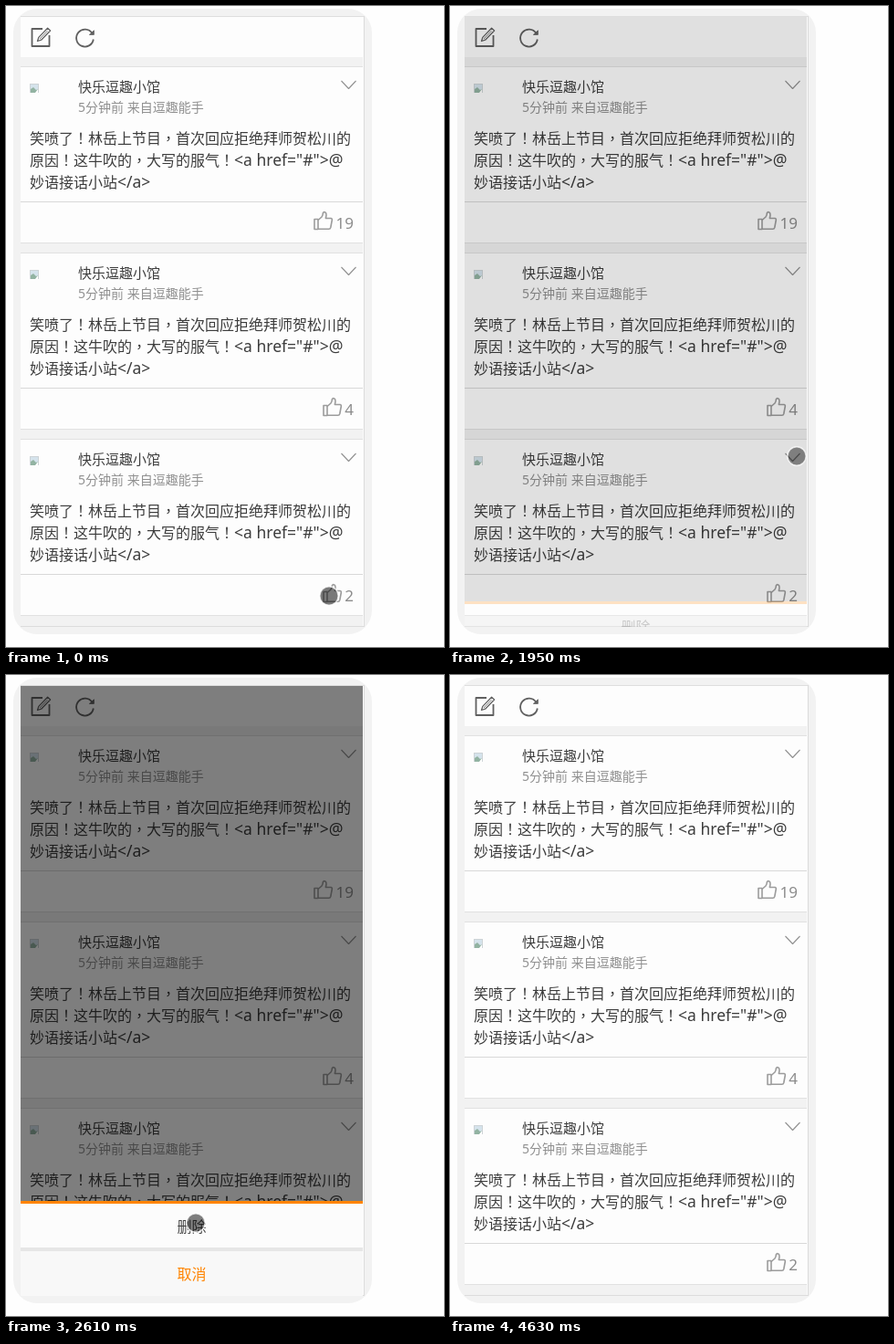
Recreate the animation shown at these times as an HTML page. Size 480 by 702 pixels, loop 5.42 s.

```html
<!DOCTYPE html>
<html lang="zh-CN">
<head>
<meta charset="utf-8">
<title>动态列表</title>
<style>
  html, body { margin: 0; width: 100%; height: 100%; overflow: hidden; background: #fefefe; }
  svg { display: block; width: 480px; height: 702px; }
  text { font: 16px "Noto Sans", "Noto Sans CJK SC", "Noto Sans CJK", sans-serif; fill: #3c3c3c; }
  .name { font-size: 15px; }
  .meta { font-size: 14px; fill: #909090; }
  .mid { font-family: "Noto Sans CJK TC", "Noto Sans CJK", sans-serif; }
  .code { font-size: 17.5px; }
  .count { font-size: 17px; fill: #8c8c8c; text-anchor: end; }
  .option { text-anchor: middle; fill: #444; }
  .cancel { fill: #ff8400; }
  .tool, .like, .arrow { fill: none; stroke-linejoin: round; }
  .tool { stroke: #606060; stroke-width: 1.8; }
  .like { stroke: #9c9c9c; stroke-width: 1.6; }
  .arrow { stroke: #909090; stroke-width: 1.1; }

  .layer, .sheet, .cursor { animation: 5420ms step-end infinite; }
  .layer { opacity: 0; animation-name: fade; }
  .sheet { animation-name: slide; }
  .cursor { animation-name: move; stroke: rgba(255, 255, 255, .75); stroke-width: 1.5; }

  @keyframes fade {
    0% { opacity: 0; }
    35.97% { opacity: .23; }
    38.92% { opacity: .81; }
    41.51% { opacity: 1; }
    67.89%, 100% { opacity: 0; }
  }
  @keyframes slide {
    0% { transform: translateY(104px); }
    35.97% { transform: translateY(76px); }
    38.92% { transform: translateY(18px); }
    41.51% { transform: none; }
    67.89%, 100% { transform: translateY(104px); }
  }
  @keyframes move {
    0% { transform: translate(354px, 646px); fill: rgba(0, 0, 0, .52); opacity: 1; }
    2.21% { transform: translate(383px, 694px); fill: rgba(0, 0, 0, .43); opacity: 0; }
    7.19% { transform: translate(383px, 694px); fill: rgba(0, 0, 0, .43); opacity: 1; }
    9.4% { transform: translate(360px, 677px); }
    11.62% { transform: translate(341px, 657px); }
    14.39% { transform: translate(347px, 653px); }
    16.6% { transform: translate(360px, 650px); }
    18.81% { transform: translate(373px, 649px); }
    21.4% { transform: translate(388px, 622px); }
    23.61% { transform: translate(393px, 578px); }
    26.01% { transform: translate(390px, 535px); }
    28.22% { transform: translate(383px, 503px); }
    30.99% { transform: translate(380px, 493px); }
    41.51% { transform: translate(368px, 508px); }
    43.72% { transform: translate(306px, 553px); }
    45.94% { transform: translate(230px, 592px); fill: rgba(0, 0, 0, .43); }
    48.15% { transform: translate(208px, 600px); fill: rgba(0, 0, 0, .5); }
    67.89% { transform: translate(208px, 600px); fill: rgba(0, 0, 0, .43); }
    75.27% { transform: translate(214px, 604px); opacity: 1; }
    77.49%, 100% { transform: translate(214px, 604px); fill: rgba(0, 0, 0, .43); opacity: 0; }
  }
</style>
</head>
<body>
<svg viewBox="0 0 480 702">
  <defs>
    <clipPath id="screen"><rect x="16" y="12" width="375" height="668"/></clipPath>
    <g id="photo">
      <rect x="26.5" y="85.5" width="9" height="9" fill="#d5e3ec" stroke="#cdd3d6"/>
      <path d="M27 95V91l3-2 3 3 2-1v4z" fill="#92b3a2"/>
      <path d="M32 95l3-4v4z" fill="#fff"/>
    </g>
    <g id="thumb" class="like">
      <path d="M1 9H5V20H1Z"/>
      <path d="M5 10L9 6.5Q10.2 5 10.4 2.2Q11.2 .6 12.8 1.4Q14.2 2.4 14 4.6L13.4 8H19Q20.6 8.2 20.3 10L18.8 18Q18.4 19.8 16.8 19.8H5"/>
    </g>
  </defs>

  <rect width="480" height="702" fill="#fefefe"/>
  <rect x="8" y="3" width="393" height="685" rx="26" fill="#f2f2f2"/>
  <path d="M16 11.5H393" stroke="#dedede"/>
  <path d="M391.5 12V679" stroke="#fbfbfb"/>
  <path d="M392.5 11V680" stroke="#dcdcdc"/>
  <path d="M16 679.5H393" stroke="#dcdcdc"/>

  <rect x="16" y="12" width="375" height="44" fill="#fdfdfd"/>
  <g class="tool">
    <path d="M40 25H28.5V44H47.5V32"/>
    <path d="M34.5 38.5L35.8 34.4L45.6 24.2L48.6 27L38.6 37.2Z" stroke-width="1.3"/>
    <path d="M37 36L45.5 27.2" stroke-width=".8"/>
    <path d="M94.4 30A9.4 9.4 0 1 0 95.8 36.5"/>
    <path d="M96.4 26.8V31.4H91.4Z" fill="#606060" stroke-width=".8"/>
  </g>

  <g id="feed"></g>

  <g clip-path="url(#screen)">
    <g class="layer">
      <rect x="16" y="12" width="375" height="668" fill="#000" fill-opacity=".5"/>
      <g class="sheet">
        <rect x="16" y="576" width="375" height="104" fill="#e6e6e6"/>
        <rect x="16" y="576" width="375" height="3" fill="#ff8400"/>
        <rect x="16" y="579" width="375" height="48" fill="#fcfcfc"/>
        <rect x="16" y="631" width="375" height="49" fill="#f8f8f8"/>
        <text class="option" x="203.5" y="610">删除</text>
        <text class="option cancel" x="203.5" y="662">取消</text>
      </g>
    </g>
  </g>

  <circle class="cursor" r="10.2"/>
</svg>
<script>
  // Traditional glyphs centre the punctuation in its cell.
  const centred = s => s.replace(/[！，]/g, '<tspan class="mid" lang="zh-TW">$&</tspan>');

  const card = (count, i) => `
    <g transform="translate(0 ${i * 204})">
      <rect x="16" y="66" width="375" height="194" fill="#fdfdfd"/>
      <path d="M16 66.5H391M16 259.5H391" stroke="#e1e1e1"/>
      <path d="M16 214.5H391" stroke="#d8d8d8"/>
      <use href="#photo"/>
      <text class="name" x="79" y="94">快乐逗趣小馆</text>
      <text class="meta" x="79" y="116">5分钟前 来自逗趣能手</text>
      <path class="arrow" d="M367.5 82L375.5 90.5L383.5 82"/>
      <text x="26" y="151">${centred("笑喷了！林岳上节目，首次回应拒绝拜师贺松川的")}</text>
      <text x="26" y="175">${centred("原因！这牛吹的，大写的服气！")}<tspan class="code">&lt;a href="#"&gt;@</tspan></text>
      <text x="26" y="199">妙语接话小站<tspan class="code">&lt;/a&gt;</tspan></text>
      <use href="#thumb" x="${357 - 10 * String(count).length}" y="224.5"/>
      <text class="count" x="381" y="244">${count}</text>
    </g>`;
  document.getElementById("feed").innerHTML = [19, 4, 2].map(card).join("");
</script>
</body>
</html>
```
